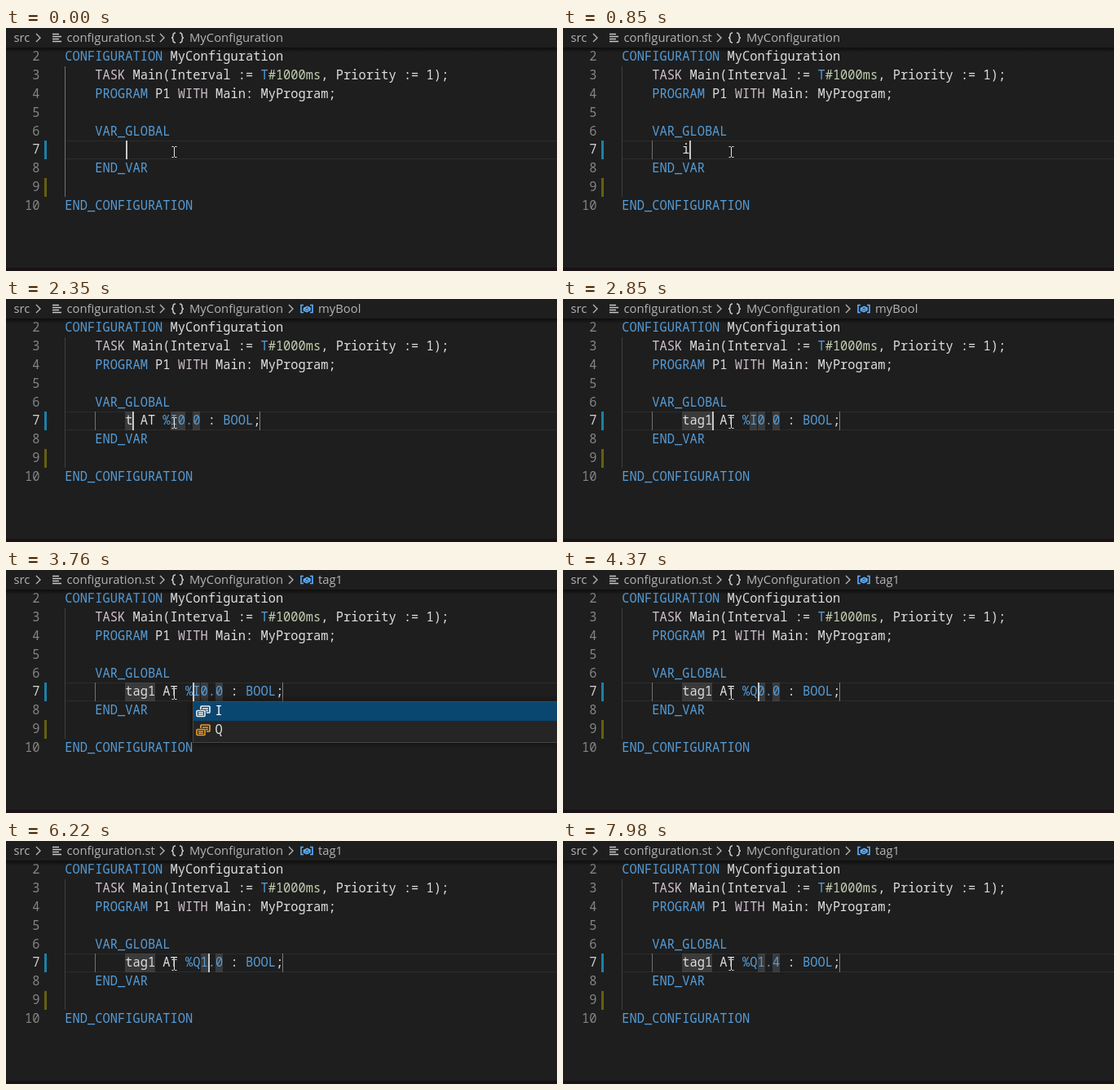
Animation, 676 px wide and 298 px high, one loop 8 s. Source, as an HTML page with a canvas:

```html
<!DOCTYPE html>
<html lang="en">
<head>
<meta charset="utf-8">
<title>Editing a global variable</title>
<style>
html, body { margin: 0; width: 100%; height: 100%; overflow: hidden; background: #1e1e1e; }
canvas { display: block; }
</style>
</head>
<body>
<canvas id="stage" width="676" height="298"></canvas>
<script>
const ctx = document.getElementById('stage').getContext('2d');
const LOOP = 8000, CHAR = 9.235, LINE = 22.8, LEFT = 72.3;
const MONO = '500 15.39px "Noto Sans Mono", monospace';
const BOLD = 'bold 15.39px "Noto Sans Mono", monospace';
const SANS = '14.8px "Open Sans", sans-serif';
const PLAIN = '#dedede', BLUE = '#569cd6', NUMBER = '#c3cfb2', CONTROL = '#d0c0cc';
const GREY = '#b4b4b4', MATCH = '#18a3ff';
const SYNTAX = /(END_\w+|\bCONFIGURATION|PROGRAM|VAR_GLOBAL|BOOL|T(?=#)|%[\w.]+|TASK|WITH|#\d+ms)/;

const LINES = {
  2: 'CONFIGURATION MyConfiguration',
  3: '    TASK Main(Interval := T#1000ms, Priority := 1);',
  4: '    PROGRAM P1 WITH Main: MyProgram;',
  6: '    VAR_GLOBAL',
  8: '    END_VAR',
  10: 'END_CONFIGURATION'
};

// Each entry changes part of the editor state from its time on.
const STEPS = [
  [0, { text: '', col: 8, on: true }],
  [390, { on: false }],
  [770, { text: 'i', col: 9, on: true }],
  [860, { text: 'io', col: 10 }],
  [1030, { popup: 'snippets' }],
  [1110, { error: true }],
  [1490, { on: false }],
  [1660, { text: 'myBool AT %I0.0 : BOOL;', col: 14, on: true, selected: [8, 6],
           popup: null, error: false, snippet: true, crumb: 'myBool' }],
  [1970, { on: false }],
  [2270, { text: 't AT %I0.0 : BOOL;', col: 9, on: true, selected: null }],
  [2430, { text: 'ta AT %I0.0 : BOOL;', col: 10 }],
  [2520, { text: 'tag AT %I0.0 : BOOL;', col: 11 }],
  [2850, { text: 'tag1 AT %I0.0 : BOOL;', col: 12 }],
  [3300, { col: 17, popup: 'choices', choice: 0, crumb: 'tag1' }],
  [3680, { on: false }],
  [3760, { on: true }],
  [4140, { on: false, choice: 1 }],
  [4370, { text: 'tag1 AT %Q0.0 : BOOL;', col: 18, on: true, popup: null }],
  [4920, { on: false }],
  [5380, { on: true }],
  [5530, { col: 19, selected: [18, 1], zeros: true }],
  [5990, { on: false }],
  [6220, { text: 'tag1 AT %Q1.0 : BOOL;', on: true, selected: null, zeros: false }],
  [6600, { col: 21, selected: [20, 1], zeros: true }],
  [6820, { on: false }],
  [7280, { on: true }],
  [7520, { text: 'tag1 AT %Q1.4 : BOOL;', selected: null, zeros: false }],
  [7980, { on: false }]
];

const stateAt = time =>
  Object.assign({}, ...STEPS.filter(([start]) => start <= time).map(([, change]) => change));
const colX = col => LEFT + col * CHAR;
const rowTop = row => 24.2 + (row - 2) * LINE;
const rowY = row => Math.round(rowTop(row));
const baseline = row => Math.round(rowTop(row) + 16.25);

function rect(x, y, w, h, color) {
  ctx.fillStyle = color;
  ctx.fillRect(x, y, w, h);
}

function label(text, x, y, color = GREY, font = SANS) {
  ctx.font = font;
  ctx.fillStyle = color;
  ctx.fillText(text, x, y);
}

function stroke(path, color, width = 1.2) {
  ctx.strokeStyle = color;
  ctx.lineWidth = width;
  ctx.stroke(new Path2D(path));
}

function mono(text, x, y, color, font = MONO) {
  [...text].forEach((char, i) => label(char, x + i * CHAR, y, color, font));
}

function tokenColor(token) {
  if (/^(TASK|WITH)$/.test(token)) return CONTROL;
  if (/^#\d/.test(token)) return NUMBER;
  return token === 'T' || SYNTAX.test(token) ? BLUE : PLAIN;
}

function code(text, row, col = 0) {
  for (const token of text.split(SYNTAX)) {
    mono(token, colX(col), baseline(row), tokenColor(token));
    col += token.length;
  }
}

function cells(row, col, count, color) {
  rect(Math.round(colX(col)), rowY(row), Math.round(count * CHAR), 23, color);
}

function breadcrumb(crumb) {
  const chevron = x => stroke(`M${x} 7l5 5l-5 5`, GREY, 1.4);
  label('src', 9.5, 17);
  chevron(37);
  stroke('M57 7.5h8M57 10.5h11M57 13.5h8M57 16.5h11', '#c8c8c8', 1.4);
  label('configuration.st', 74.5, 17);
  chevron(189);
  stroke('M208 6q-3 0 -3 3t-2 3q2 0 2 3t3 3M213 6q3 0 3 3t2 3q-2 0 -2 3t-3 3', '#c8c8c8', 1.5);
  label('MyConfiguration', 225, 17);
  if (!crumb) return;
  chevron(347);
  stroke('M365 7.5h-3v9h3M373 7.5h3v9h-3M365.5 11.5l4 -2l3.5 1.5v2.5l-4 2l-3.5 -1.5zl3.5 1.5l4 -2', '#5eb0ff', 1.6);
  label(crumb, 383, 17);
}

function gutter() {
  for (let row = 2; row <= 10; row++) {
    const number = String(row);
    mono(number, 41.5 - number.length * CHAR, baseline(row), row === 7 ? '#d0d0d0' : '#858585');
  }
  rect(47, rowY(7), 3, 23, '#1b81a8');
  rect(47, rowY(9), 3, 23, '#66610e');
}

function placeholders(text) {
  const address = 8 + text.indexOf('%');
  const mark = (col, count = 1) => cells(7, col, count, 'rgba(124,124,124,.3)');
  mark(8, text.indexOf(' '));
  if (text.includes('%I')) mark(address + 1);
  mark(address + 2);
  mark(address + 4);
  rect(Math.round(colX(8 + text.length)) - 1, rowY(7), 1, 23, '#7c7c7c');
}

function snippetIcon(x, y, color) {
  stroke(`M${x + 5.5} ${y + 19}v-14.5h15v14.5`, color, 1.4);
  stroke(`M${x + 5} ${y + 18.5}h3m1.5 0h2.5m2 0h2.5m1.5 0h3`, color, 1.5);
}

function wordIcon(x, y, color) {
  label('abc', x + 4, y + 15, color, 'bold 10.5px "Open Sans", sans-serif');
}

function choiceIcon(x, y, color, back) {
  stroke(`M${x + 10} ${y + 10}v-4q0 -1 1 -1h9q1 0 1 1v6q0 1 -1 1h-3M${x + 12} ${y + 8}h7M${x + 16} ${y + 10.5}h3`, color, 1.7);
  rect(x + 4, y + 9, 12, 10, back);
  stroke(`M${x + 6} ${y + 10.5}h8q1 0 1 1v5q0 1 -1 1h-8q-1 0 -1 -1v-5q0 -1 1 -1M${x + 7} ${y + 13}h6M${x + 7} ${y + 15.2}h6`, color, 1.6);
}

function popupBox(x, height) {
  ctx.save();
  ctx.shadowColor = 'rgba(0,0,0,.6)';
  ctx.shadowBlur = 8;
  rect(x, 161, 700, height, '#454545');
  ctx.restore();
  rect(x + 1, 162, 700, height - 2, '#252526');
}

function popupRow(x, index, selected, text, icon, matches = []) {
  const top = 162 + index * LINE, y = Math.round(top);
  const back = selected ? '#094771' : '#252526';
  rect(x + 1, y, 700, 23, back);
  icon(x, y, selected ? '#f0f0f0' : icon === choiceIcon ? '#ee9d28' : '#cccccc', back);
  [...text].forEach((char, i) => {
    const hit = matches.includes(i);
    mono(char, x + 27.5 + i * CHAR, Math.round(top + 16.4), hit ? MATCH : selected ? '#ffffff' : PLAIN, hit ? BOLD : MONO);
  });
}

function popup({ popup: kind, choice }) {
  if (kind === 'snippets') {
    popupBox(165, 160);
    ['bool', 'byte', 'dword', 'word'].forEach((type, i) =>
      popupRow(165, i, i === 0, 'io ' + type, snippetIcon, [0, 1]));
    ['IJsonContainerElement', 'IJsonElement'].forEach((word, i) =>
      popupRow(165, i + 4, false, word, wordIcon, [0, 3]));
  } else if (kind === 'choices') {
    popupBox(229, 51);
    ['I', 'Q'].forEach((letter, i) => popupRow(229, i, i === choice, letter, choiceIcon));
  }
}

function draw(time) {
  const state = stateAt(time);
  rect(0, 0, 676, 298, '#1e1e1e');

  rect(72, rowY(7), 604, 1, '#2c2c2c');
  rect(72, rowY(7) + 22, 604, 1, '#2c2c2c');
  if (state.error) rect(72, rowY(8), 604, 23, '#3a2123');
  rect(72, rowY(3), 1, rowY(10) - rowY(3), state.text ? '#404040' : '#707070');
  if (state.text) rect(109, rowY(7), 1, 23, '#707070');

  if (state.snippet) placeholders(state.text);
  if (state.selected) cells(7, ...state.selected, '#264f78');
  if (state.zeros) {
    cells(3, 29, 3, 'rgba(173,214,255,.15)');
    if (state.col === 19) cells(7, 20, 1, 'rgba(173,214,255,.15)');
  }

  gutter();
  for (const row in LINES) code(LINES[row], Number(row));
  code(state.text, 7, 8);
  if (state.error) stroke('M109 185l2 -3l3 3l3 -3l2 3', '#f14c4c', 1);

  const shade = ctx.createLinearGradient(0, 24, 0, 30);
  shade.addColorStop(0, 'rgba(0,0,0,.55)');
  shade.addColorStop(1, 'rgba(0,0,0,0)');
  rect(0, 24, 676, 6, shade);
  rect(0, 294, 676, 4, '#1a1217');
  breadcrumb(state.crumb);

  popup(state);
  if (state.on) rect(Math.round(colX(state.col)) + (state.col === 8 ? 1 : 0), rowY(7), 2, 23, '#c8c8c8');
  stroke('M203.5 145.5h2l1 1l1 -1h2M206.5 146v12M203.5 158.5h2l1 -1l1 1h2', '#e8e8e8', 1);
}

function tick() {
  draw(performance.now() % LOOP);
  requestAnimationFrame(tick);
}
tick();
</script>
</body>
</html>
```
